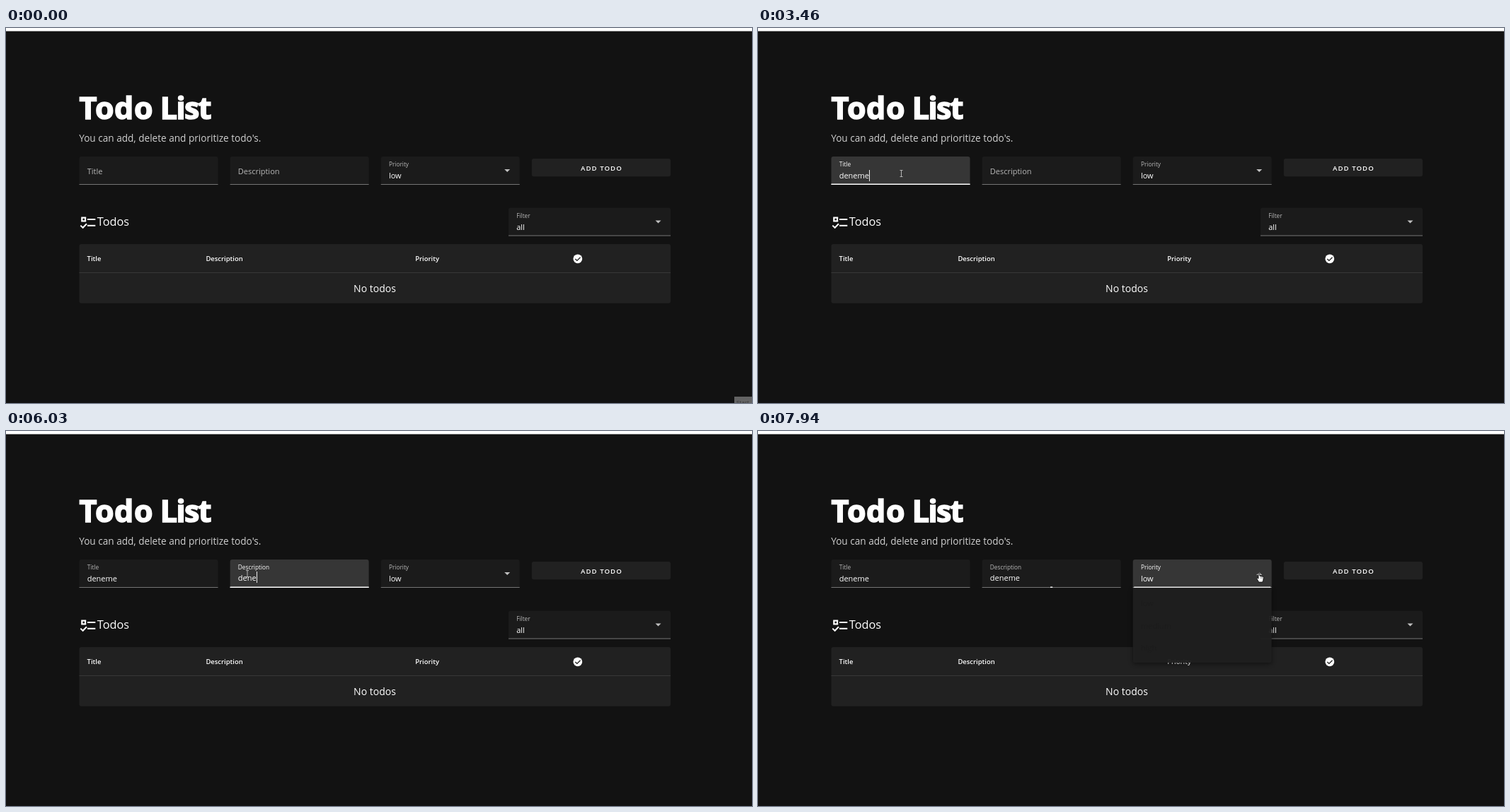
Recreate the animation shown at these times as an HTML page with a canvas. Size 1054 by 531 pixels, loop 8000 ms.

```html
<!DOCTYPE html>
<html lang="en">
<head>
<meta charset="utf-8">
<title>Todo List</title>
<style>
html, body { margin: 0; width: 100%; height: 100%; overflow: hidden; background: #121212; }
canvas { display: block; }
</style>
</head>
<body>
<canvas id="stage" width="1054" height="531"></canvas>
<script>
const c = document.getElementById('stage').getContext('2d');
const LOOP = 8000;
const FONT = '"Open Sans", "Noto Sans", sans-serif';

const clamp = v => Math.max(0, Math.min(1, v));
const easeOut = v => 1 - (1 - clamp(v)) ** 2;
const mix = (a, b, k) => a + (b - a) * k;
const gray = v => `rgb(${v},${v},${v})`;

function text(str, x, y, size, { color = '#fff', weight = 400, align = 'left', spacing = 0 } = {}) {
  c.font = `${weight} ${size}px ${FONT}`;
  c.letterSpacing = spacing + 'px';
  c.textAlign = align;
  c.fillStyle = color;
  c.fillText(str, x, y);
}

function box(x, y, w, h, color, radii = 3) {
  c.fillStyle = color;
  c.beginPath();
  c.roundRect(x, y, w, h, radii);
  c.fill();
}

function path(points, { fill, stroke, width = 1 }) {
  c.beginPath();
  points.forEach(([x, y]) => c.lineTo(x, y));
  if (fill) {
    c.closePath();
    c.fillStyle = fill;
    c.fill();
  }
  if (stroke) {
    c.strokeStyle = stroke;
    c.lineWidth = width;
    c.stroke();
  }
}

// Form fields; keys holds the time of each typed letter
const fields = [
  { label: 'Title', x: 103.5, y: 182, w: 196, value: 'deneme', base: 213.3, caretY: 201,
    focus: 1330, blur: 4420, keys: [2200, 2400, 3060, 3130, 3260, 3460] },
  { label: 'Description', x: 316.6, y: 182, w: 196, value: 'deneme', base: 212.3, caretY: 199,
    focus: 4420, blur: 7810, keys: [5350, 5490, 5890, 6030, 6160, 6290] },
  { label: 'Priority', x: 529.7, y: 182, w: 196, value: 'low', base: 213.3, select: true,
    focus: 7810, blur: Infinity },
  { label: 'Filter', x: 710, y: 254.5, w: 229, value: 'all', base: 286.4, select: true,
    focus: Infinity, blur: Infinity }
];

// Pointer: time, x, y
const moves = [
  [400, 768, 498], [860, 233, 258], [1190, 202.5, 206], [3900, 202.5, 206], [4420, 341, 202],
  [6780, 341, 202], [6890, 517, 205], [7030, 590, 212], [7130, 661, 215], [7800, 709.5, 207.5]
];

function pointerAt(t) {
  if (t < moves[0][0]) return null;
  const i = moves.findIndex(m => m[0] > t);
  if (i < 0) return moves.at(-1).slice(1);
  const [t0, x0, y0] = moves[i - 1], [t1, x1, y1] = moves[i];
  const k = easeOut((t - t0) / (t1 - t0));
  return [mix(x0, x1, k), mix(y0, y1, k)];
}

const inside = (p, f) => p && p[0] > f.x && p[0] < f.x + f.w && p[1] > f.y && p[1] < f.y + 40;

function drawField(f, t, pointer) {
  const hover = inside(pointer, f);
  const focusIn = easeOut((t - f.focus) / 150);
  const active = focusIn * (1 - easeOut((t - f.blur) / 150));
  const focused = t >= f.focus && t < f.blur;
  const float = f.select ? 1 : focusIn;
  const tx = f.x + 11.2, right = f.x + f.w;

  box(f.x, f.y, f.w, 40, gray(Math.round(mix(hover ? 33 : 27, 54, active))), [3, 3, 0, 0]);
  c.fillStyle = hover ? '#949494' : '#747474';
  c.fillRect(f.x, f.y + 39, f.w, 1);
  const line = f.w * active;
  c.fillStyle = '#fff';
  c.fillRect(f.x + (f.w - line) / 2, f.y + 38.5, line, 1.5);

  text(f.label, tx, f.y + mix(24.5, 14.1, float), mix(11, 8.3, float),
    { color: gray(Math.round(mix(184, 255, active))) });

  if (f.select) {
    text(f.value, tx, f.base, 11);
    const ax = right - 17.5, ay = f.y + 20, d = focused ? -2 : 2;
    path([[ax - 4, ay - d], [ax + 4, ay - d], [ax, ay + d]], { fill: '#c0c0c0' });
    return;
  }
  const pressed = f.keys.filter(k => k <= t);
  const typed = f.value.slice(0, pressed.length);
  text(typed, tx, f.base, 11);
  const since = t - (pressed.at(-1) ?? f.focus);
  if (focused && since % 1060 < 530) {
    c.fillStyle = '#eee';
    c.fillRect(Math.round(tx + c.measureText(typed).width), f.caretY, 1, 16);
  }
}

function drawPage() {
  c.fillStyle = '#121212';
  c.fillRect(0, 0, 1054, 531);
  c.fillStyle = '#fff';
  c.fillRect(0, 0, 1054, 4.5);

  // Heavy heading: bold letters with an outline
  c.strokeStyle = '#fff';
  c.lineWidth = 1.6;
  for (const [word, x, spacing] of [['Todo', 103.4, 0.6], ['List', 217.8, -1.6]]) {
    text(word, x, 129.2, 43, { weight: 700, spacing });
    c.strokeText(word, x, 129.2);
  }
  text("You can add, delete and prioritize todo's.", 103.2, 160.8, 13.6, { color: '#d0d0d0' });

  box(742.8, 185, 196.2, 25.2, '#212121');
  text('ADD TODO', 841.4, 201.7, 9.6, { weight: 600, align: 'center', spacing: 1.05 });

  // List icon
  c.strokeStyle = '#fff';
  c.lineWidth = 2.2;
  c.strokeRect(107.3, 268.6, 4.8, 4.8);
  path([[115, 271], [126.3, 271]], { stroke: '#fff', width: 2 });
  path([[115, 279.8], [126.3, 279.8]], { stroke: '#fff', width: 2 });
  path([[105.3, 279.6], [108.6, 282.8], [114, 277.3]], { stroke: '#fff', width: 2 });
  text('Todos', 128.8, 279.8, 16.3);

  // Table
  box(103.5, 306, 835.5, 83.7, '#212121');
  c.fillStyle = '#383838';
  c.fillRect(103.5, 346, 835.5, 1);
  for (const [label, x] of [['Title', 114.6], ['Description', 282.4], ['Priority', 578.2]])
    text(label, x, 330.2, 9.45, { weight: 600 });
  c.fillStyle = '#fff';
  c.beginPath();
  c.arc(807.8, 326.8, 6.4, 0, 7);
  c.fill();
  path([[804.3, 327], [806.8, 329.4], [811.5, 324.8]], { stroke: '#212121', width: 1.4 });
  text('No todos', 521, 374.2, 14, { align: 'center' });
}

function drawMenu(t) {
  if (t < 7870) return;
  c.save();
  c.globalAlpha = t < 7940 ? 0.3 : 0.93;
  c.shadowColor = 'rgba(0,0,0,.5)';
  c.shadowBlur = 6;
  c.shadowOffsetY = 2;
  box(529.7, 222, 196, 106, '#202020', [0, 0, 3, 3]);
  c.shadowColor = 'transparent';
  ['low', 'medium', 'high'].forEach((item, i) =>
    text(item, 541, 248 + i * 31.5, 11, { color: '#1c1c1c' }));
  c.restore();
}

function drawPointer(p) {
  if (!p) return;
  const over = fields.find(f => inside(p, f));
  c.save();
  c.translate(...p);
  c.lineJoin = 'round';
  if (!over) {
    path([[0, -1], [0, 9], [2.3, 7], [4, 10.6], [5.6, 9.8], [4, 6.4], [7, 6.2], [0, -1]],
      { fill: '#fff', stroke: '#000', width: 0.8 });
  } else if (over.select) {
    path([[-2.5, -6.5], [-0.8, -6.5], [-0.6, -2.4], [4, -1.2], [4.8, 0], [4.2, 4],
      [3.2, 6.5], [-1.8, 6.5], [-4.8, 1.5], [-4.4, 0.3], [-2.5, 1.6], [-2.5, -6.5]],
      { fill: '#fff', stroke: '#000', width: 0.8 });
    path([[1, -1.2], [1, 1.4]], { stroke: '#555', width: 0.6 });
    path([[2.8, -0.8], [2.8, 1.4]], { stroke: '#555', width: 0.6 });
  } else {
    const ink = { stroke: '#b4b4b4' };
    path([[0, -4.5], [0, 4.5]], ink);
    path([[-2, -4.5], [2, -4.5]], ink);
    path([[-2, 4.5], [2, 4.5]], ink);
  }
  c.restore();
}

function frame(now) {
  const t = now % LOOP;
  const pointer = pointerAt(t);
  drawPage();
  fields.forEach(f => drawField(f, t, pointer));
  drawMenu(t);
  drawPointer(pointer);
  if (t < 70) {
    c.fillStyle = '#636363';
    c.fillRect(1029, 522, 25, 9);
    text('Start', 1032, 533, 8, { color: '#333' });
  }
  requestAnimationFrame(frame);
}
requestAnimationFrame(frame);
</script>
</body>
</html>
```
